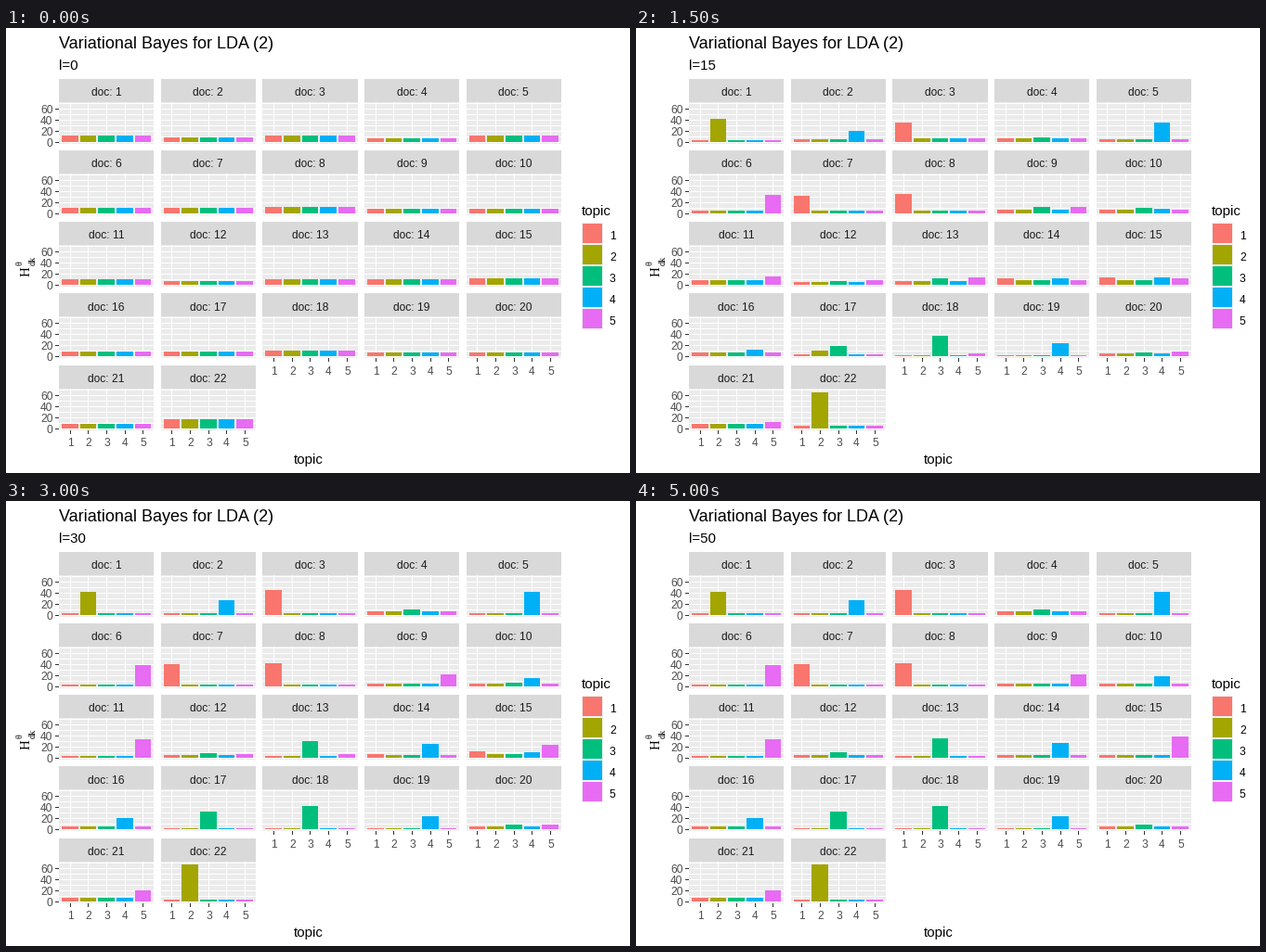
A matplotlib script for the animation above (5100 ms loop, 672 px wide and 480 px high).

```python
import matplotlib.pyplot as plt
import numpy as np
from matplotlib.animation import FuncAnimation
from matplotlib.collections import PolyCollection

W, H, DPI = 672, 480, 100
STEPS = 51

# Panel layout in pixels
LEFT, TOP = 56.87, 54.65
PITCH_X, PITCH_Y = 109.68, 77.25
PANEL_W, STRIP_H, CELL_H = 102.35, 24.95, 70.0
ZERO, SCALE = 122.6, 0.6
UNIT = PANEL_W / 5.2

COLORS = ["#F8766D", "#A3A500", "#00BF7D", "#00B0F6", "#E76BF3"]


class Doc:
    """Five topics sharing a fixed total: one takes over, rivals come and go."""

    def __init__(self, start, leader, mid, floor=3.3, **rivals):
        self.start, self.leader, self.mid = start, leader - 1, mid
        self.gain = 4 * (start - floor)
        self.rivals = [(int(name[1:]) - 1, *bump) for name, bump in rivals.items()]

    def heights(self, step):
        rise = 1 / (1 + np.exp(6 * (1 - step / self.mid)))
        h = np.full(5, self.start - self.gain * rise / 4)
        h[self.leader] = self.start + self.gain * rise
        for topic, size, peak in self.rivals:
            bump = size * np.exp(-(2.5 * (step / peak - 1)) ** 2)
            h[np.arange(5) != self.leader] -= bump / 4
            h[topic] += bump
        return h


# Start height, winning topic, step of its steepest rise, final height of the
# others; rivals as topic=(size, peak step)
DOCS = [
    Doc(11.0, 2, 7.9),
    Doc(7.8, 4, 14),
    Doc(11.4, 1, 13),
    Doc(6.2, 3, 14, 5.5),
    Doc(11.0, 4, 12.5),
    Doc(10.2, 5, 12),
    Doc(10.5, 1, 13),
    Doc(10.8, 1, 12, t2=(5, 9)),
    Doc(7.9, 5, 19, 4.5, t3=(6, 16)),
    Doc(7.4, 4, 26, 4.8, t3=(6, 20)),
    Doc(9.4, 5, 19),
    Doc(6.7, 3, 24, 5.9, t5=(6, 21)),
    Doc(9.7, 3, 24, t5=(11, 21)),
    Doc(9.4, 4, 20, 5.1, t1=(6, 22)),
    Doc(11.4, 5, 31, 4.6, t1=(9, 23), t4=(7, 22)),
    Doc(8.1, 4, 17, 5),
    Doc(8.2, 3, 15.5, 2, t2=(15, 11)),
    Doc(10.2, 3, 12, 2, t5=(9, 10)),
    Doc(6.8, 4, 9.5, 2.5),
    Doc(6.6, 3, 24, 6.1, t5=(6, 23)),
    Doc(8.3, 5, 18, 5.5),
    Doc(16.0, 2, 9.7),
]

fig = plt.figure(figsize=(W / DPI, H / DPI), dpi=DPI, facecolor="white")
ax = fig.add_axes([0, 0, 1, 1])
ax.set_xlim(0, W)
ax.set_ylim(H, 0)
ax.axis("off")


def px(v):
    return int(np.floor(v + 0.5))


def box(x0, y0, x1, y1):
    x0, y0, x1, y1 = map(px, (x0, y0, x1, y1))
    return [(x0, y0), (x1, y0), (x1, y1), (x0, y1)]


def add_boxes(boxes, colors, z):
    art = PolyCollection(boxes, facecolors=colors, edgecolors="none",
                         linewidths=0, antialiaseds=False, zorder=z)
    return ax.add_collection(art, autolim=False)


def text(x, y, s, size, color="black", ha="left", font="Liberation Sans", rot=0):
    return ax.text(x, y, s, fontsize=size * 72 / DPI, color=color, ha=ha,
                   va="baseline", family=font, rotation=rot,
                   rotation_mode="anchor", zorder=5)


shapes, fills = [], []


def paint(x0, y0, x1, y1, color):
    shapes.append(box(x0, y0, x1, y1))
    fills.append(color)


def cell(n):
    row, col = divmod(n, 5)
    return LEFT + col * PITCH_X, row * PITCH_Y


for n in range(len(DOCS)):
    x, dy = cell(n)
    top, bottom, right = TOP + dy, TOP + dy + CELL_H, x + PANEL_W
    zero = ZERO + dy
    paint(x, top, right, top + STRIP_H, "#D9D9D9")
    paint(x, top + STRIP_H, right, bottom, "#EBEBEB")
    for v in range(0, 71, 10):
        y = px(zero - v * SCALE)
        paint(x, y, right, y + 1, "white")
    for k in range(5):
        cx = px(x + (k + 0.6) * UNIT)
        paint(cx, top + STRIP_H, cx + 1, bottom, "white")
        if n + 5 >= len(DOCS):
            paint(cx, bottom, cx + 1, bottom + 4, "#333333")
            text(cx + 0.5, px(bottom + 17.3), str(k + 1), 12, "#4D4D4D", "center")
    if n % 5 == 0:
        for v in range(0, 61, 20):
            y = px(zero - v * SCALE)
            paint(x - 4, y, x, y + 1, "#333333")
            text(x - 6.4, y + 5, str(v), 12, "#4D4D4D", "right")
    text(x + PANEL_W / 2, px(top + 18.2), f"doc: {n + 1}", 12, "#1A1A1A", "center")

# Legend
text(620, 202, "topic", 15)
for k, color in enumerate(COLORS):
    y = 209.7 + 23.04 * k
    paint(620, y, 643, y + 23.04, "#F2F2F2")
    paint(621, y + 1, 642, y + 22, color)
    text(650, px(y + 18.6), str(k + 1), 12)

add_boxes(shapes, fills, 1)

text(57, 22, "Variational Bayes for LDA (2)", 18)
subtitle = text(57, 45, "l=0", 15)
text(326, 470, "topic", 15, ha="center")
for x, y, s, size in ((26, 268, "H", 15), (32, 256, "dk", 10), (18, 256, "θ", 10)):
    text(x, y, s, size, font="Liberation Serif", rot=90)


def bar_boxes(step):
    boxes = []
    for n, doc in enumerate(DOCS):
        x, dy = cell(n)
        zero = ZERO + dy
        for k, v in enumerate(doc.heights(step)):
            x0 = x + (k + 0.15) * UNIT
            boxes.append(box(x0, zero - v * SCALE, x0 + 0.9 * UNIT, zero))
    return boxes


bars = add_boxes(bar_boxes(0), COLORS * len(DOCS), 3)


def update(step):
    bars.set_verts(bar_boxes(step))
    subtitle.set_text(f"l={step}")
    return bars, subtitle


anim = FuncAnimation(fig, update, frames=STEPS, interval=100, repeat=True,
                     repeat_delay=0, blit=False)
plt.show()
```
